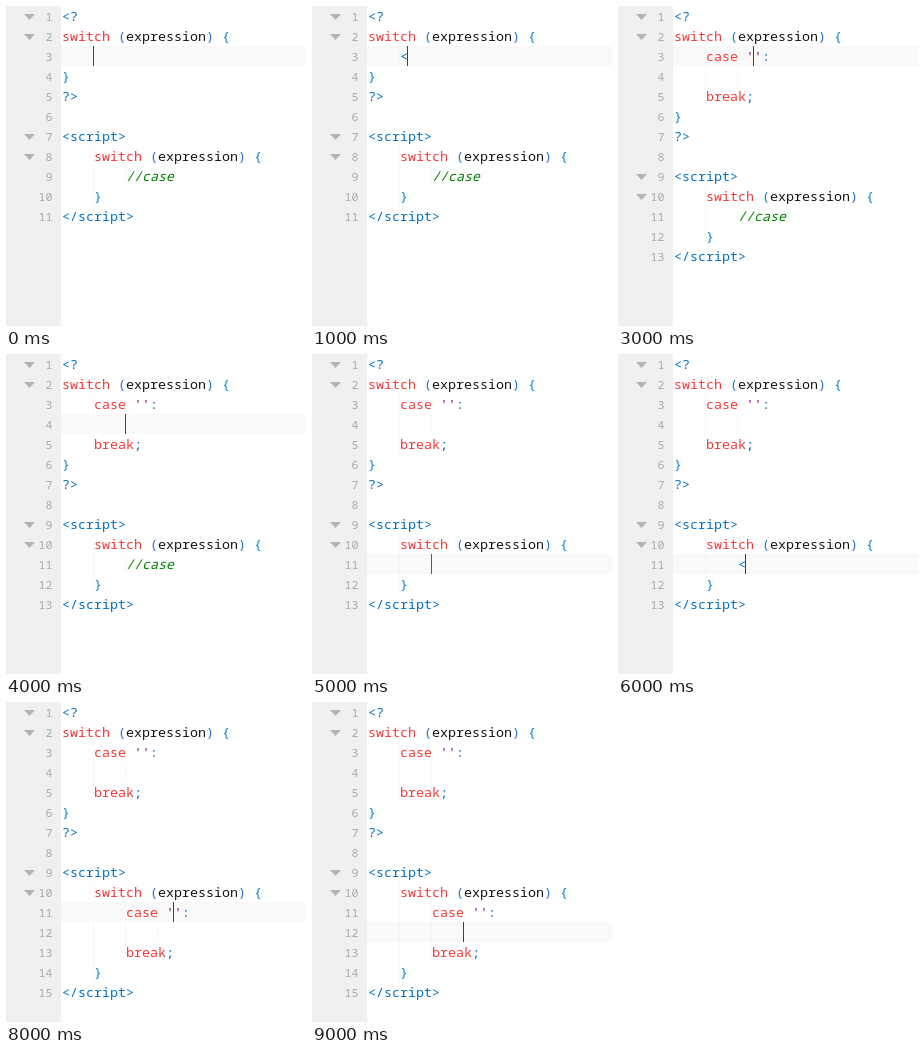
An HTML page with a canvas for the animation above (10000 ms loop, 300x320 px).

```html
<!DOCTYPE html>
<html lang="en">
<head>
<meta charset="utf-8">
<title>Switch case snippet</title>
<style>
  html, body { margin: 0; width: 100%; height: 100%; overflow: hidden; background: #fff; }
  canvas { display: block; width: 300px; height: 320px; }
</style>
</head>
<body>
<canvas id="editor"></canvas>
<script>
const WIDTH = 300, HEIGHT = 320, ROW = 20, COL = 8, GUTTER = 55, BASELINE = 15;
const STEP_MS = 1000;
const FONT = '"Noto Sans Mono", monospace';
const COLORS = {
  gutter: '#f0f0f0', number: '#aaa', fold: '#b4b4b4', active: '#f9f9f9', guide: '#f1f1f1',
  comment: '#008000', keyword: '#fa3636', quote: '#800080', word: '#151515',
  brace: '#0086d6', paren: '#2a6fc9', tag: '#0070c8'
};
const TOKEN = /\/\/.*|<\/?script>|<\?|\?>|'|[(){}:;<]|\w+/g;

// One entry per second: [cursor row, cursor column, cursor colour]
const DARK = '#404040';
const CURSORS = [
  [2, 4, DARK], [2, 5, DARK], [2, 6, DARK], [2, 10, DARK], [3, 8, DARK],
  [10, 8, '#b83434'], [10, 9, DARK], [10, 10, DARK], [10, 14, DARK], [11, 12, DARK]
];

const canvas = document.getElementById('editor');
const scale = window.devicePixelRatio || 1;
canvas.width = WIDTH * scale;
canvas.height = HEIGHT * scale;
const ctx = canvas.getContext('2d', { alpha: false });
ctx.scale(scale, scale);

const snippet = indent => [indent + "case '':", indent + '    ', indent + 'break;'];

function documentAt(step) {
  const typed = ['', '<', '<c'];
  const small = ' '.repeat(4), large = ' '.repeat(8);
  const phpBody = step < 3 ? [small + typed[step]] : snippet(small);
  const jsBody = step < 5 ? [large + '//case']
    : step < 8 ? [large + typed[step - 5]] : snippet(large);
  return ['<?', 'switch (expression) {', ...phpBody, '}', '?>', '',
    '<script>', small + 'switch (expression) {', ...jsBody, small + '}', '<\/script>'];
}

function tokenColor(token) {
  if (token.startsWith('//')) return COLORS.comment;
  if (/^(switch|case|break)$/.test(token)) return COLORS.keyword;
  if (token === "'") return COLORS.quote;
  if (/^\w/.test(token)) return COLORS.word;
  if (/[{}]/.test(token)) return COLORS.brace;
  if (/[()]/.test(token)) return COLORS.paren;
  return COLORS.tag;
}

function rect(color, x, y, w, h) {
  ctx.fillStyle = color;
  ctx.fillRect(x, y, w, h);
}

function drawGutter(line, row) {
  const y = row * ROW;
  ctx.font = `11.67px ${FONT}`;
  ctx.textAlign = 'right';
  ctx.fillStyle = COLORS.number;
  ctx.fillText(row + 1, 46.5, y + BASELINE);
  if (!/^<\?|^<script>|{$/.test(line)) return;
  ctx.fillStyle = COLORS.fold;
  ctx.beginPath();
  ctx.moveTo(18, y + 8);
  ctx.lineTo(29, y + 8);
  ctx.lineTo(23.5, y + 14);
  ctx.fill();
}

function drawLine(line, row) {
  const y = row * ROW;
  const indent = line.match(/^ */)[0].length;
  for (let col = 4; col <= indent; col += 4) {
    for (let dot = 0; dot < ROW; dot += 2) {
      rect(COLORS.guide, GUTTER + col * COL, y + dot, 1, 1);
    }
  }
  ctx.textAlign = 'left';
  for (const match of line.matchAll(TOKEN)) {
    const token = match[0];
    ctx.font = `${token.startsWith('//') ? 'italic ' : ''}13.333px ${FONT}`;
    ctx.fillStyle = tokenColor(token);
    ctx.fillText(token, GUTTER + 1 + match.index * COL, y + BASELINE);
  }
}

function draw(step) {
  const [row, col, color] = CURSORS[step];
  rect('#fff', 0, 0, WIDTH, HEIGHT);
  rect(COLORS.gutter, 0, 0, GUTTER, HEIGHT);
  rect(COLORS.active, GUTTER, row * ROW, WIDTH - GUTTER, ROW);
  documentAt(step).forEach((line, index) => {
    drawGutter(line, index);
    drawLine(line, index);
  });
  rect(color, GUTTER + col * COL, row * ROW, 1, ROW);
}

const start = performance.now();
function tick() {
  const elapsed = Math.max(0, performance.now() - start);
  draw(Math.floor(elapsed / STEP_MS) % CURSORS.length);
  requestAnimationFrame(tick);
}
tick();
</script>
</body>
</html>
```
